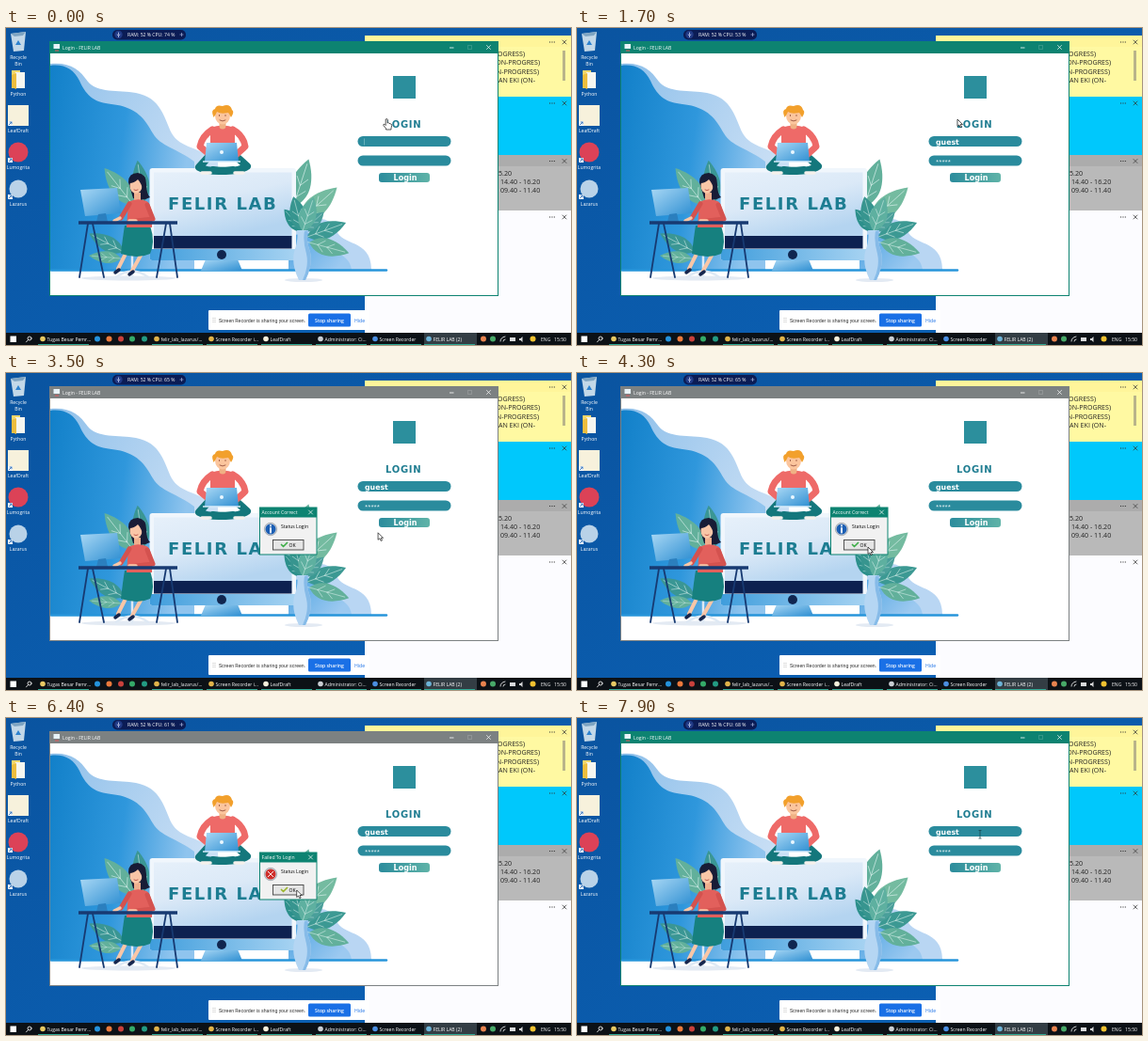
An HTML page that plays this animation: 600x337 px, repeating every 8000 ms.

```html
<!DOCTYPE html>
<html lang="en">
<head>
<meta charset="utf-8">
<title>Login screen recording</title>
<style>
html, body { margin: 0; width: 100%; height: 100%; overflow: hidden; background: #0a58a6; }
svg { display: block; width: 100%; height: 100%; }
text { font: 5.1px "Open Sans", sans-serif; white-space: pre; }
.w { fill: #fff; }
.mid { text-anchor: middle; }
.note text { font-size: 7.1px; fill: #222; }
.note .end { text-anchor: end; }
.brand { font-family: "DejaVu Sans", sans-serif; font-weight: 700; }
.line { fill: none; stroke-linecap: round; stroke-linejoin: round; }
</style>
</head>
<body>
<svg viewBox="0 0 600 337" xmlns="http://www.w3.org/2000/svg">
<defs>
  <linearGradient id="desk" x2="1" y2="1"><stop stop-color="#0a54a0"/><stop offset="1" stop-color="#0b62b7"/></linearGradient>
  <linearGradient id="waveBack" x2="1" y2=".6"><stop stop-color="#8fc0ea"/><stop offset="1" stop-color="#cfe2f6"/></linearGradient>
  <linearGradient id="waveFront" x2="1" y2=".2"><stop stop-color="#1280c9"/><stop offset=".55" stop-color="#2f97dc"/><stop offset="1" stop-color="#8fc4ee"/></linearGradient>
  <linearGradient id="pool" x2="1" y2=".5"><stop stop-color="#4ea4e2"/><stop offset="1" stop-color="#9cc9f0"/></linearGradient>
  <linearGradient id="screen" x2=".5" y2="1"><stop stop-color="#e6f0fa"/><stop offset=".5" stop-color="#dbe9f7"/><stop offset="1" stop-color="#b4d4f0"/></linearGradient>
  <linearGradient id="chin" x2="1"><stop stop-color="#3f9ddc"/><stop offset="1" stop-color="#a7d3f2"/></linearGradient>
  <linearGradient id="metal" x2="1" y2="1"><stop stop-color="#a9d8f5"/><stop offset="1" stop-color="#2f8fd2"/></linearGradient>
  <linearGradient id="button" x2="1"><stop stop-color="#2b8c9c"/><stop offset="1" stop-color="#5fb3a8"/></linearGradient>
  <g id="leaf"><path d="M0 0C-13-9-11-24 0-38C11-24 13-9 0 0Z"/><path d="M0 2V-34M0-8l-6-6M0-8l6-6M0-17l-5-6M0-17l5-6" class="line" stroke="#d6eeea" stroke-width=".5"/></g>
  <path id="cross" d="M-2-2l4 4m0-4l-4 4" class="line" stroke-width=".7"/>
  <g id="shortcut"><path d="M0 0h5v5H0z" class="w"/><path d="M1 4l3-3M2 1h2v2" class="line" stroke="#1d62b0" stroke-width=".8"/></g>
</defs>

<rect width="600" height="337" fill="url(#desk)"/>

<!-- desktop icons -->
<g class="w">
  <path d="M5 6l16-2-2 20-11 1z" fill="#c3d8e8"/><path d="M5 6l16-2-3 4-9 1z" fill="#7fa5c2"/>
  <path d="M10 18l3-5 3 5z" fill="#2d82cf"/>
  <path d="M6 45h9v19H6z" fill="#f5d66b"/><path d="M10 47h10v17H10z" fill="#f6f6f0"/><path d="M6 50l5-2v17l-5-2z" fill="#eebd3d"/>
  <rect x="2" y="82" width="22" height="22" fill="#f7f1dc"/>
  <circle cx="13" cy="132" r="10.5" fill="#dc4257"/>
  <circle cx="13" cy="171" r="9.5" fill="#b9d2e8"/>
  <use href="#shortcut" x="2" y="99"/><use href="#shortcut" x="2" y="138"/><use href="#shortcut" x="2" y="177"/>
  <g class="mid">
    <text x="13" y="33">Recycle</text><text x="13" y="39.5">Bin</text><text x="13" y="72">Python</text>
    <text x="13" y="111">LeafDraft</text><text x="13" y="150">Lumogrita</text><text x="13" y="189">Lazarus</text>
  </g>
</g>

<!-- load meter -->
<rect x="113" y="2" width="78" height="10.5" rx="5" fill="#0b1c55"/>
<circle cx="119.5" cy="7" r="4.2" fill="#203a86"/>
<path d="M119.5 5v2.2M118 7.2q1.500 2 3 0M119.5 8.500v1" class="line" stroke="#dfe6ff" stroke-width=".7"/>
<text x="129" y="9" class="w" id="meter"></text>
<path d="M184.5 7h4M186.5 5v4" stroke="#b9c6ee" stroke-width=".6"/>

<!-- sticky notes -->
<g class="note">
  <path d="M381 8h219v65H381z" fill="#fff9a2"/><path d="M381 8h219v12H381z" fill="#fff59a"/>
  <text x="471" y="17.5" style="font-size:5.2px">PROJECT</text>
  <text class="end" x="551" y="29.5">(ON-PROGRESS)</text><text class="end" x="567" y="39">BAR (ON-PROGRES)</text>
  <text class="end" x="566" y="48.5">(ON-PROGRESS)</text><text class="end" x="562" y="58">DAN EKI (ON-</text>
  <path d="M592.5 24v32" stroke="#b9b48a" stroke-width="3"/>
  <path d="M381 73h219v62H381z" fill="#00c8fc"/>
  <path d="M381 135h219v59H381z" fill="#b9b9b9"/><path d="M381 135h219v12H381z" fill="#acacac"/>
  <text class="end" x="537" y="156.5">13.40 - 15.20</text><text x="525" y="165.5">14.40 - 16.20</text><text x="525" y="174.5">09.40 - 11.40</text>
  <path d="M381 194h219v130H381z" fill="#fcfcff"/>
  <g stroke="#333"><use href="#cross" x="593" y="15"/><use href="#cross" x="593" y="80"/><use href="#cross" x="593" y="141.5"/><use href="#cross" x="593" y="201"/></g>
  <path d="M577 15h6M577 80h6M577 141.500h6M577 201h6" stroke="#333" stroke-width="1.1" stroke-dasharray="1.1 1.3"/>
</g>

<!-- login window -->
<rect x="46" y="14" width="477" height="271" id="frame"/>
<rect x="47" y="27" width="475" height="257" fill="#fff"/>
<rect x="50.5" y="17" width="6.5" height="5" fill="#e8f3f8"/><path d="M52 24h4" stroke="#d55"/>
<text x="60" y="22.5" class="w">Login - FELIR LAB</text>
<g stroke="#fff" fill="none" stroke-width=".8"><path d="M471 21h4.500"/><path d="M490.500 18.500h4v4h-4z" opacity=".2"/><use href="#cross" x="512.5" y="20.5"/></g>

<!-- background shapes -->
<path d="M47 38C68 36 78 44 87 57C96 69 120 66 138 69C165 74 168 96 176 112C185 128 205 126 225 142V240H47Z" fill="url(#waveBack)"/>
<path d="M47 40C62 38 72 44 78 56C86 74 95 79 112 81C140 84 148 98 156 112C164 126 182 128 200 142V257H47Z" fill="url(#waveFront)"/>
<path d="M300 206C325 200 346 200 351 215C356 232 388 224 388 257H300Z" fill="#b9d6f3"/>
<path d="M300 222C322 215 336 218 342 230C348 241 365 240 367 257H300Z" fill="url(#pool)"/>
<path d="M48 257.500H404" class="line" stroke="#2795da" stroke-width="2.4"/>
<g fill="#e3eaf3"><ellipse cx="130" cy="266" rx="50" ry="2.500"/><ellipse cx="316" cy="268" rx="20" ry="2"/></g>

<!-- foliage beside the monitor -->
<g fill="#62b09b">
  <use href="#leaf" transform="translate(135 188) rotate(-38) scale(1.100 1.300)"/>
  <use href="#leaf" transform="translate(146 186) rotate(-8) scale(1 1.200)" fill="#3a9694"/>
  <use href="#leaf" transform="translate(125 238) rotate(-62) scale(.9 1.100)" fill="#3a9694"/>
  <use href="#leaf" transform="translate(122 245) rotate(-85) scale(.7 .9)"/>
  <use href="#leaf" transform="translate(150 232) rotate(25) scale(.8)"/>
  <use href="#leaf" transform="translate(305 190) rotate(18) scale(1.200 1.400)"/>
  <use href="#leaf" transform="translate(312 205) rotate(48) scale(1.200 1.400)" fill="#74bba0"/>
  <use href="#leaf" transform="translate(320 222) rotate(70) scale(1 1.150)" fill="#3c9993"/>
  <use href="#leaf" transform="translate(322 228) rotate(105) scale(1 1.150)"/>
</g>

<!-- large monitor -->
<path d="M212 246h34l5 12h-44z" fill="url(#metal)"/>
<rect x="152.5" y="149" width="155.5" height="98" rx="3" fill="#f0f6fc"/>
<rect x="157" y="153.5" width="146.5" height="69" fill="url(#screen)"/>
<rect x="157" y="221" width="146.5" height="13.5" fill="#0d2150"/>
<path d="M152.500 235h155.500v9q0 3-3 3H155.500q-3 0-3-3z" fill="url(#chin)"/>
<circle cx="229" cy="241" r="5" fill="#102650"/>
<text x="172" y="192.5" class="brand" fill="#1d7d92" style="font-size:18px" letter-spacing="1.6">FELIR LAB</text>

<!-- vase -->
<g fill="#4a9f9a">
  <use href="#leaf" transform="translate(315 216) rotate(-40) scale(.8)" fill="#2c8f8b"/>
  <use href="#leaf" transform="translate(315 216) rotate(48) scale(.8)"/>
  <use href="#leaf" transform="translate(315 216) rotate(-15)" fill="#37958f"/>
  <use href="#leaf" transform="translate(315 216) rotate(18)" fill="#5eb0a0"/>
</g>
<path d="M309 215h12Q318 224 323 238Q326 252 318 268H311Q303 252 306 238Q311 224 309 215Z" fill="#b5d6f3"/>
<path d="M317 216Q315 226 319 240Q322 253 315 268H318Q326 252 323 238Q318 224 321 215Z" fill="#86bbe8"/>

<!-- man with laptop -->
<g class="line">
  <path d="M215 137L205 148Q216 154 241 151M245 137L256 147Q245 154 220 151" stroke="#14777c" stroke-width="8"/>
  <path d="M208 154h9M243 154h9" stroke="#f5f1ec" stroke-width="3.500"/>
  <path d="M219 108Q208 115 206 126L218 136M241 108Q252 114 254 126L243 136" stroke="#ee6a68" stroke-width="7"/>
  <path d="M217 106Q230 101 243 106L243 137H217Z" fill="#ee6a68"/>
  <path d="M230 98v6" stroke="#f0b184" stroke-width="7"/>
</g>
<ellipse cx="230" cy="93" rx="8" ry="9.5" fill="#fbc59d"/>
<path d="M220.500 95Q217 87 222 86Q223 81 230 83Q238 80 240 87Q243 89 239 95Q237 91 236 90Q228 92 224 89Q223 92 220.500 95Z" fill="#f2a02c"/>
<path d="M226.500 92.500v1M233 92.500v1M227 98q3 2 6 0" class="line" stroke="#8a4333" stroke-width=".8"/>
<path d="M213 122h32l2 20h-36z" fill="url(#metal)"/><circle cx="229" cy="132" r="2" fill="#eaf7ff"/>
<path d="M209 142h40" stroke="#d8edfa" stroke-width="1.5"/>

<!-- woman at her desk -->
<g class="line">
  <path d="M134 240v20M117 265Q134 252 151 265M134 255v11" stroke="#dfe9f4" stroke-width="2.500"/>
  <path d="M128 238L119 256M144 240L134 258" stroke="#f9c6a7" stroke-width="4"/>
  <path d="M116 260l4-3M131 262l4-3" stroke="#16264d" stroke-width="3.500"/>
</g>
<path d="M126 210H153Q159 228 153 240Q140 246 122 240Q124 222 126 210Z" fill="#16807f"/>
<path d="M130 164Q130 154 140 154Q149 155 149 166Q149 176 153 180Q144 185 135 181Z" fill="#181c36"/>
<path d="M136 175h7v9h-7z" fill="#efae8d"/>
<ellipse cx="138" cy="167.5" rx="6.5" ry="8.5" fill="#f9c6a7"/>
<path d="M131 165Q132 156 140 156Q148 158 146 174Q144 165 140 161Q136 165 131 165Z" fill="#181c36"/>
<path d="M136 172q2 1.500 4 0" class="line" stroke="#b5483f" stroke-width=".8"/>
<path d="M130 185Q139 180 149 184Q156 187 155 212H128Z" fill="#e2605c"/>
<path d="M150 188L156 203L138 205M131 187L122 202" class="line" stroke="#d4524f" stroke-width="5"/>
<path d="M121 202L115 205M138 205h-7" class="line" stroke="#f9c6a7" stroke-width="3.5"/>
<path d="M79 172l39-2 4 27-38 3z" fill="url(#metal)"/><path d="M98 198l8-1 2 9H96z" fill="#2b7fbe"/>
<path d="M77 207H182" stroke="#173a72" stroke-width="3.5"/>
<path d="M87 208L78 265M92 208L104 265M170 208L160 265M174 208L182 265" class="line" stroke="#173a72" stroke-width="1.8"/>

<!-- login form -->
<rect x="411" y="51" width="24" height="24" fill="#2c8f9d"/>
<text x="403" y="105.5" class="brand" fill="#217e92" style="font-size:10px" letter-spacing=".7">LOGIN</text>
<g fill="#2a8b9d"><rect x="373.5" y="115" width="99" height="11" rx="5.5"/><rect x="373.5" y="135.5" width="99" height="11" rx="5.5"/></g>
<rect x="396" y="154" width="54" height="10" rx="3" fill="url(#button)"/>
<g class="w">
  <text x="424" y="162" class="brand mid" style="font-size:8px">Login</text>
  <text x="381" y="123.5" class="brand" style="font-size:7.800px" id="user"></text>
  <text x="381" y="144" style="font-size:5.800px" id="pass"></text>
</g>
<path d="M380.500 117.500v7" stroke="#7fc0c8" stroke-width=".7" id="caret"/>

<!-- message box -->
<g id="dialog">
  <rect x="269" y="142.5" width="61.5" height="51" fill="#0d8371"/>
  <rect x="270" y="153.5" width="59.5" height="39" fill="#f1f1f1"/>
  <text x="271.5" y="150" class="w" id="caption"></text>
  <use href="#cross" x="323.5" y="148" stroke="#fff"/>
  <circle cx="281" cy="166" r="6.7" fill="#c9ced4" stroke="#8b929b" stroke-width=".6"/>
  <circle cx="281" cy="166" r="5.5" id="badge"/>
  <path d="M281 162.300v.2M281 165v4.500" class="line" stroke="#fff" stroke-width="1.9" id="infoMark"/>
  <use href="#cross" transform="translate(281 166) scale(1.35)" stroke="#fff" style="stroke-width:1.6" id="errorMark"/>
  <text x="292" y="164.5">Status Login</text>
  <rect x="283.5" y="177.5" width="32.5" height="10.5" fill="#e5e5e5" stroke="#444" stroke-width=".9"/>
  <path d="M292.500 182.500l2 2 4-4" class="line" stroke-width="1.7" id="tick"/>
  <text x="300.5" y="185">OK</text>
</g>

<!-- sharing bar -->
<rect x="215" y="300" width="171" height="21" rx="1" fill="#fff"/>
<path d="M220 308v6M222 308v6" stroke="#999" stroke-width=".8" stroke-dasharray=".8 1.2"/>
<text x="226" y="312.5" fill="#333" style="font:5.250px Roboto,sans-serif">Screen Recorder is sharing your screen.</text>
<rect x="321" y="303.5" width="45" height="14" rx="1.5" fill="#1a70e6"/>
<text x="343.5" y="312.5" class="w mid" style="font-weight:600">Stop sharing</text>
<text x="370" y="312.5" fill="#1a70e6">Hide</text>

<!-- taskbar -->
<path d="M0 324h600v13H0z" fill="#0c1116"/>
<path d="M444 324h56v13h-56z" fill="#333d44"/>
<rect x="4.5" y="327.5" width="6.5" height="6.5" class="w"/>
<g class="line" stroke="#fff" stroke-width=".8"><circle cx="25" cy="330" r="2"/><path d="M23.500 331.500l-2 2.300M525 333q0-4 5-5M528 333q0-2 2-2"/></g>
<g id="tasks"></g>
<g class="w">
  <text x="568" y="332.5">ENG</text><text x="582" y="332.5">15:50</text>
  <path d="M535 329h6v4h-6zM545 330h1.500l2-2v6l-2-2H545z" opacity=".85"/>
</g>

<!-- pointers -->
<g fill="#fff" stroke="#111" stroke-width=".7" stroke-linejoin="round">
  <path id="arrow" d="M0 0V7.500L1.800 6L3.100 8.700L4.400 8.100L3.200 5.500H5.500Z"/>
  <path id="hand" d="M-.8 0Q.2-1 1.200 0V4Q2.500 3.300 3 4.500Q4.300 4 4.500 5.200Q5.800 5 5.700 6.500L5 9.500V11H-.5V9.800L-3.200 6.500Q-3.500 5-2 5.300L-.8 6.500Z"/>
  <path id="beam" d="M-1.500-4.500H1.500M0-4.500V4M-1.500 4H1.500" stroke="#123f49"/>
</g>
</svg>

<script>
const LOOP = 8000;
const $ = id => document.getElementById(id);
const show = (id, on) => { $(id).style.display = on ? '' : 'none'; };

// Taskbar entries: left edge, icon colour, label
const tasks = [[34, '#e8c964', 'Tugas Besar Pemr...'], [155, '#e0b34a', 'felir_lab_lazarus/...'],
  [213, '#e0b34a', 'Screen Recorder i...'], [271, '#f7f1dc', 'LeafDraft'],
  [329, '#c9ced3', 'Administrator: Ci...'], [387, '#4b8fe2', 'Screen Recorder'], [444, '#6cb4d8', 'FELIR LAB (2)']];
const dots = [[97, '#2492dc'], [109.5, '#ec7a3c'], [122, '#c8413c'], [134, '#35aa68'], [147, '#239b83'],
  [507, '#e8834f'], [517, '#48a868'], [559.5, '#f2c230']];
$('tasks').innerHTML = tasks.map(([x, color, label]) =>
  `<circle cx="${x + 5}" cy="330.5" r="2.8" fill="${color}"/>
   <text x="${x + 9.5}" y="332.5" class="w">${label}</text>
   <path d="M${x} 336.5h54" stroke="#2fa894"/>`).join('') +
  dots.map(([x, color]) => `<circle cx="${x}" cy="330.5" r="3" fill="${color}"/>`).join('');

const cpuLoad = [[0, 74], [1200, 53], [2300, 57], [3500, 65], [5300, 61], [7500, 68]];
const pointers = [[0, 'hand'], [300, 'arrow'], [2700, 'hand'], [3400, 'arrow'], [7700, 'beam']];
const path = [[0, 404, 97], [2000, 404, 97], [2800, 411, 167], [3300, 411, 167], [4100, 309, 185],
  [4300, 309, 185], [4600, 303, 184], [4900, 303, 184], [5000, 374, 247], [5200, 374, 247],
  [5500, 315, 163], [5900, 309, 183], [7300, 308, 183], [7800, 428, 124], [LOOP, 428, 124]];
const userKeys = [300, 450, 600, 750, 900];
const passKeys = [1100, 1200, 1300, 1400, 1700];

const current = (steps, t) => steps.filter(s => s[0] <= t).pop()[1];
const typed = (keys, t) => keys.filter(k => k <= t).length;

function position(t) {
  const i = path.findIndex(p => p[0] > t);
  const [t0, x0, y0] = path[i - 1], [t1, x1, y1] = path[i];
  const u = (t - t0) / (t1 - t0), ease = u * u * (3 - 2 * u);
  return [x0 + (x1 - x0) * ease, y0 + (y1 - y0) * ease];
}

function draw(now) {
  const t = Math.floor(now % LOOP / 100) * 100;
  const correct = t >= 3400 && t < 6000, failed = t >= 6200 && t < 7400;

  $('meter').textContent = `RAM: 52 % CPU: ${current(cpuLoad, t)} %`;
  $('user').textContent = 'guest'.slice(0, typed(userKeys, t));
  $('pass').textContent = '*'.repeat(typed(passKeys, t));
  show('caret', t < 300);

  $('frame').setAttribute('fill', correct || failed ? '#7c8182' : '#0d8371');
  show('dialog', correct || failed);
  show('infoMark', !failed);
  show('errorMark', failed);
  $('caption').textContent = failed ? 'Failed To Login' : 'Account Correct';
  $('badge').setAttribute('fill', failed ? '#cf2f2b' : '#1c5fb4');
  $('tick').setAttribute('stroke', failed ? '#9bb52c' : '#3fae49');

  const pointer = current(pointers, t);
  for (const id of ['arrow', 'hand', 'beam']) show(id, id === pointer);
  $(pointer).setAttribute('transform', `translate(${position(t)})`);
  requestAnimationFrame(draw);
}
draw(0);
</script>
</body>
</html>
```
